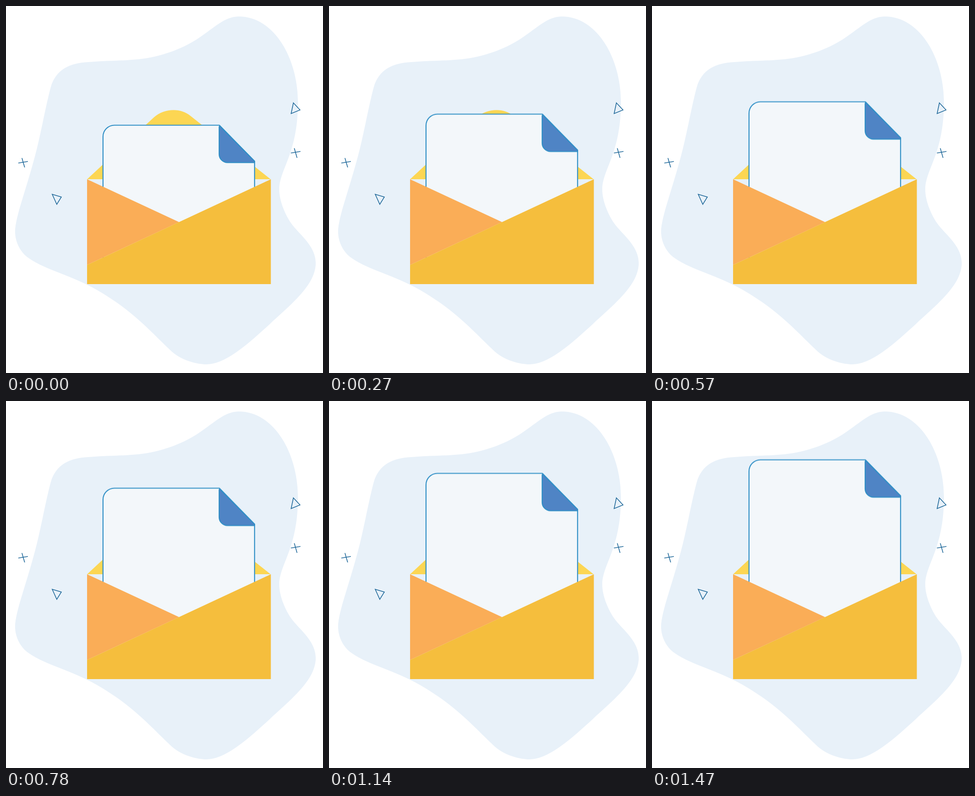
An HTML page for the animation above (1500 ms loop, 696 by 805 pixels).

```html
<!DOCTYPE html>
<html lang="en">
<head>
<meta charset="utf-8">
<title>Open envelope</title>
<style>
  html, body { margin: 0; width: 100%; height: 100%; overflow: hidden; background: #fff; }
  svg { display: block; width: 696px; height: 805px; }
  .blob { fill: #e8f1f9; }
  .back { fill: #fcd653; }
  .side { fill: #faad57; }
  .front { fill: #f5be3d; }
  .sheet { fill: #f3f7fa; }
  .fold { fill: #4f84c5; }
  .sheet, .fold { stroke: #2f8fc6; stroke-width: 2.2; stroke-linejoin: round; }
  .marks { fill: none; stroke: #20699a; stroke-width: 1.6; }
  .letter { animation: rise 1.5s steps(50) infinite; }
  @keyframes rise { to { transform: translateY(-135.2px); } }
</style>
</head>
<body>
<svg viewBox="0 0 696 805">
  <path class="blob" d="M511 23C590 23 641 117 641 210C641 325 600 358 600 403
    C600 425 611 454 625 475C642 500 680 525 680 564C680 612 625 655 580 697
    C535 738 483 786 440 786C417 786 384 776 364 758C330 727 290 680 226 639
    C155 591 91 583 47 551C29 537 20 515 20 495C20 462 46 400 68 312
    C79 267 88 216 98 179C109 139 140 125 181 123C230 119 262 121 305 115
    C346 109 392 92 425 69C457 48 480 23 511 23Z"/>
  <g class="marks">
    <path d="M631 212.5L645.5 228L626 236ZM101.5 413L121.5 419L111.500 435Z"/>
    <path d="M27 344.500L48 341M35 333.500L41 354M625.500 322.500L646.500 319M633 312L639 333"/>
  </g>
  <path class="back" d="M178 380L325 244C346 225 383 222 405 241L581 380Z"/>
  <g class="letter">
    <path class="sheet" d="M213 608V286.500A25 25 0 0 1 238 261.500H468.500L545.800 340.500V608"/>
    <path class="fold" d="M468 265V325A18.500 18.500 0 0 0 486.500 343.500H545.800V340.500L469 263Z"/>
  </g>
  <path class="side" d="M178 380L380 474L178 568Z"/>
  <path class="front" d="M581.500 380V610H178V568Z"/>
</svg>
</body>
</html>
```
